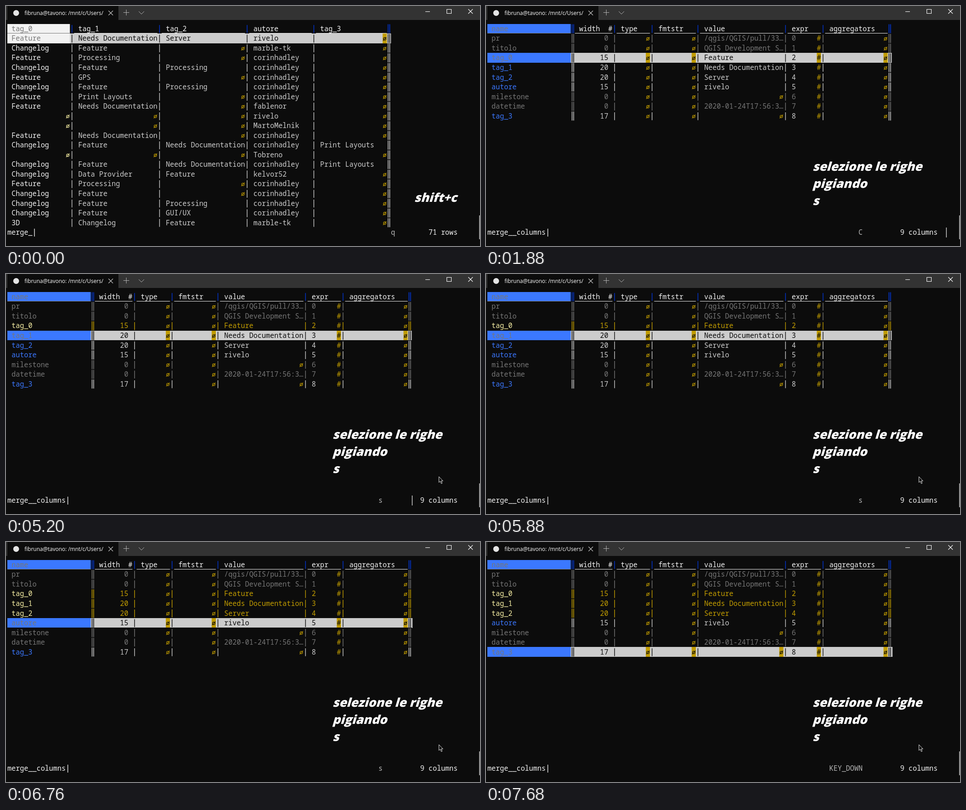
Recreate the animation shown at these times as an HTML page with a canvas. Size 1050 by 533 pixels, loop 8 s.

```html
<!DOCTYPE html>
<html lang="it">
<head>
<meta charset="utf-8">
<title>Terminal</title>
<style>
html, body { margin: 0; width: 100%; height: 100%; overflow: hidden; background: #0c0c0c; }
canvas { display: block; }
</style>
</head>
<body>
<canvas id="stage" width="1050" height="533"></canvas>
<script>
const ctx = document.getElementById('stage').getContext('2d');
const LOOP = 8000, CW = 9.237, RH = 21.54, LEFT = 3, TOP = 39.5, STATUS = 21;
const BLACK = '#0c0c0c', WHITE = '#f2f2f2', LIGHT = '#cccccc', GRAY = '#767676',
  BLUE = '#3b78ff', NAVY = '#0037da', GOLD = '#c19c00', PALE = '#f9f1a5';

const rows = text => text.trim().split('\n').map(s => s.split(','));

// Character column of the separator after each field
function edges(...widths) {
  let end = -1;
  return widths.map(w => end += w + 1);
}

// ~ marks an empty value, > a right-aligned one, a final # the number sign
const tags = {
  seps: edges(15, 20, 20, 15, 17), keyBar: false,
  head: ['tag_0', 'tag_1', 'tag_2', 'autore', 'tag_3'],
  rows: rows(`
Feature,Needs Documentation,Server,rivelo,~
Changelog,Feature,~,marble-tk,~
Feature,Processing,~,corinhadley,~
Changelog,Feature,Processing,corinhadley,~
Feature,GPS,~,corinhadley,~
Changelog,Feature,Processing,corinhadley,~
Feature,Print Layouts,~,corinhadley,~
Feature,Needs Documentation,~,fablenor,~
~,~,~,rivelo,~
~,~,~,MartoMelnik,~
Feature,Needs Documentation,~,corinhadley,~
Changelog,Feature,Needs Documentation,corinhadley,Print Layouts
~,~,~,Tobreno,~
Changelog,Feature,Needs Documentation,corinhadley,Print Layouts
Changelog,Data Provider,Feature,kelvor52,~
Feature,Processing,~,corinhadley,~
Changelog,Feature,~,corinhadley,~
Changelog,Feature,Processing,corinhadley,~
Changelog,Feature,GUI/UX,corinhadley,~
3D,Changelog,Feature,marble-tk,~`)
};
const columns = {
  seps: edges(20, 9, 8, 10, 20, 8, 15), keyBar: true,
  head: ['name', 'width#', 'type', 'fmtstr', 'value', 'expr', 'aggregators'],
  rows: rows(`
pr,0,/qgis/QGIS/pull/33…
titolo,0,QGIS Development S…
tag_0,15,Feature
tag_1,20,Needs Documentation
tag_2,20,Server
autore,15,rivelo
milestone,0,~
datetime,0,2020-01-24T17:56:3…
tag_3,17,~`).map(([name, width, value], i) => [name, '>' + width, '~', '~', value, i + '#', '~'])
};

// The first press opens the column sheet, each later one moves down a row
const presses = [[1880, 'C'], [5200, 's'], [6040, 's'], [6760, 's'],
  [7200, 'KEY_DOWN'], [7440, 'KEY_DOWN'], [7680, 'KEY_DOWN']];
const path = [[80, 961, 498], [280, 961, 460], [440, 947, 439], [560, 959, 450]];

const X = col => LEFT + col * CW;
const Y = row => TOP + row * RH;

function rect(x, y, w, h, color) {
  ctx.fillStyle = color;
  ctx.fillRect(x, y, w, h);
}
function fill(from, to, row, color) {
  const y = Math.round(Y(row));
  rect(X(from), y, X(to) - X(from), Math.round(Y(row + 1)) - y, color);
}
function label(text, x, y, font, color) {
  ctx.font = font;
  ctx.fillStyle = color;
  ctx.fillText(text, x, y);
}
function put(text, col, row, color) {
  label(text, X(col), Y(row) + 16.3, '500 15.4px "Noto Sans Mono", monospace', color);
}
function stroke(color, width, ...lines) {
  ctx.strokeStyle = color;
  ctx.lineWidth = width;
  ctx.beginPath();
  for (const [x1, y1, x2, y2] of lines) {
    ctx.moveTo(x1, y1);
    ctx.lineTo(x2, y2);
  }
  ctx.stroke();
}
function cross(x, y, r, color) {
  stroke(color, 1.1, [x - r, y - r, x + r, y + r], [x + r, y - r, x - r, y + r]);
}
function bar(col, row, color, double) {
  const x = X(col + .5) - .7, y = Y(row);
  if (!double) return rect(x, y + 2.7, 1.4, 17.5, color);
  for (const dx of [-1.8, 1.8]) rect(x + dx, y + 1, 1.6, 20, color);
}
function empty(col, row, color) {
  const x = X(col + .5), y = Y(row) + 12;
  stroke(color, 1.1, [x - 3.8, y + 4, x + 3.8, y - 4]);
  ctx.beginPath();
  ctx.arc(x, y, 2.9, 0, 7);
  ctx.stroke();
}

function drawRow({ seps, keyBar }, row, cells, style) {
  const { key, fg, line = fg, sign = GOLD, bg, keyBg } = style;
  const last = seps.length - 1;
  if (bg) fill(0, seps[last] + 1, row, bg);
  if (keyBg) fill(0, seps[0], row, keyBg);
  cells.forEach((cell, i) => {
    const end = seps[i], start = i ? seps[i - 1] + 2 : 1;
    const color = i ? fg : key;
    const numeric = cell.endsWith('#');
    if (bg && (numeric || cell === '~')) fill(end - 1, end, row, GOLD);
    if (cell === '~') empty(end - 1, row, bg ? BLACK : i ? GOLD : PALE);
    else if (cell[0] === '>') put(cell.slice(1), end - cell.length, row, color);
    else put(cell.replace('#', ''), start, row, color);
    if (numeric) put('#', end - 1, row, bg ? BLACK : sign);
    bar(end, row, line, i === last || (!i && keyBar));
  });
}

function drawTable(table, keyBg, rowStyle) {
  const { seps, head } = table;
  drawRow(table, 0, head, { key: GRAY, fg: WHITE, line: NAVY, sign: WHITE, keyBg });
  seps.forEach((end, i) => {
    const from = i ? seps[i - 1] + 1 : 0;
    rect(X(from), 60, X(end) - X(from), 1, i ? WHITE : GRAY);
  });
  table.rows.forEach((cells, i) => drawRow(table, i + 1, cells, rowStyle(i + 1, cells)));
}

function tagStyle(row) {
  return row === 1 ? { key: GRAY, fg: BLACK, bg: LIGHT, keyBg: WHITE } : { key: WHITE, fg: LIGHT };
}
function columnStyle(now) {
  return (row, cells) => {
    const hidden = cells[1] === '>0';
    if (row === now)
      return hidden ? { key: GRAY, fg: BLACK, bg: GRAY } : { key: GRAY, fg: BLACK, bg: LIGHT, keyBg: BLUE };
    if (hidden) return { key: GRAY, fg: GRAY };
    if (row >= 3 && row <= 5 && row < now) return { key: PALE, fg: GOLD };
    return { key: BLUE, fg: LIGHT };
  };
}

function drawWindow() {
  rect(0, 0, 1050, 533, BLACK);
  rect(0, 0, 1050, 31, '#333333');
  rect(3, 0, 246, 31, BLACK);
  ctx.fillStyle = '#e4e4e4';
  ctx.beginPath();
  ctx.arc(22.5, 15.5, 6.5, 0, 7);
  ctx.fill();
  label('fibruna@tavono: /mnt/c/Users/', 41, 20, '12px "Open Sans", sans-serif', '#ffffff');
  cross(232, 15.5, 5, '#c4c4c4');
  stroke('#b4b4b4', 1, [260, 14.5, 273, 14.5], [266.5, 8, 266.5, 21],
    [294, 12, 300, 18], [300, 18, 306, 12]);
  cross(1029, 12, 5, '#ffffff');
  stroke('#ffffff', 1.1, [929, 12.5, 939, 12.5]);
  ctx.strokeRect(976.5, 7.5, 10, 9);
  rect(1048, 465, 2, 53, '#9b9b9b');
}

function caption(lines, x, y) {
  ctx.save();
  ctx.transform(1, 0, -.3, 1, x, y);
  lines.forEach((s, i) => {
    const dy = i * 38;
    label(s, dy * .3, dy, '800 27px "Open Sans", sans-serif', '#ffffff');
  });
  ctx.restore();
}

function drawStatus(name, key, keyEnd, count, col) {
  put(name, 0, STATUS, WHITE);
  bar(name.length, STATUS, WHITE);
  put(key, keyEnd - key.length, STATUS, '#b8b8b8');
  put(count, col, STATUS, WHITE);
}

function drawCaret(col, row) {
  rect(Math.round(X(col) - .4), Math.round(Y(row)), 1.5, 22, LIGHT);
}

function drawPointer(t) {
  const i = path.findIndex(p => p[0] > t);
  let [, x, y] = path[path.length - 1];
  if (i > 0) {
    const [t0, x0, y0] = path[i - 1], [t1, x1, y1] = path[i];
    const k = (t - t0) / (t1 - t0);
    x = x0 + (x1 - x0) * k;
    y = y0 + (y1 - y0) * k;
  }
  ctx.save();
  ctx.translate(x, y);
  const arrow = new Path2D('M0 0V13L3 10.2L5.2 15.5L7.3 14.6L5.1 9.6H9Z');
  ctx.fillStyle = BLACK;
  ctx.fill(arrow);
  ctx.strokeStyle = '#e8e8e8';
  ctx.lineWidth = 1;
  ctx.stroke(arrow);
  ctx.restore();
}

function drawTags(t) {
  drawTable(tags, WHITE, tagStyle);
  if (t < 1400) caption(['shift+c'], 904, 435);
  drawStatus('merge_', 'q', 93, '71 rows', 101);
  if (t >= 560 && (t - 560) % 1080 < 600) drawCaret(107, STATUS);
}

function drawColumns(t, pressed) {
  const now = pressed + 2;
  const [since, key] = presses[pressed - 1];
  drawTable(columns, BLUE, columnStyle(now));
  caption(['selezione le righe', 'pigiando', 's'], 723, 366);
  drawStatus('merge__columns', key, 90, '9 columns', 99);
  // A new key leaves the caret in the status line, a repeated one at the row's end
  if (pressed === 1) drawCaret(110, STATUS);
  else if ((t - since) % 700 < 460)
    drawCaret(97, key === presses[pressed - 2][1] ? now : STATUS);
}

function draw(t) {
  drawWindow();
  const pressed = presses.filter(p => p[0] <= t).length;
  if (pressed) drawColumns(t, pressed);
  else drawTags(t);
  // The pointer hides while typing
  if (t >= 2880 || (t >= 80 && !pressed)) drawPointer(t);
}

const begin = performance.now();
function tick() {
  draw((performance.now() - begin) % LOOP);
  requestAnimationFrame(tick);
}
tick();
</script>
</body>
</html>
```
